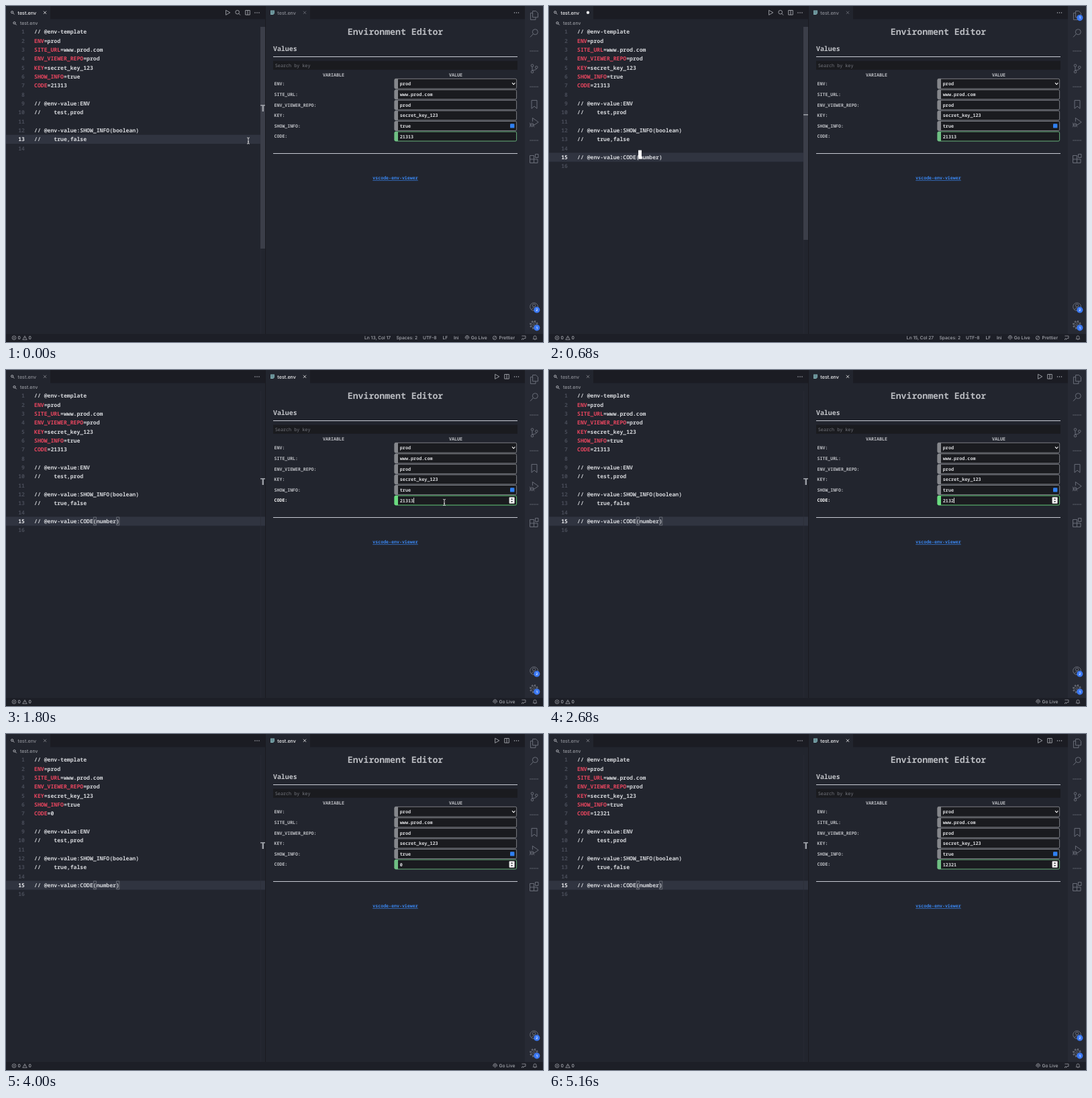
Recreate the animation shown at these times as an HTML page. Size 800 px wide and 500 px high, loop 5200 ms.

```html
<!DOCTYPE html>
<html lang="en">
<head>
<meta charset="utf-8">
<title>Environment Editor</title>
<style>
  html, body { margin: 0; width: 100%; height: 100%; overflow: hidden; background: #22252e; }
  svg { display: block; width: 100vw; height: 100vh; }
  text { white-space: pre; text-rendering: geometricPrecision; }
  .ui { font-family: Inter, "Liberation Sans", sans-serif; fill: #a9abb2; }
  .mono { font-family: "Noto Sans Mono", "DejaVu Sans Mono", monospace; fill: #d6d8dc; }
  .tab { font-size: 7.2px; font-weight: 500; }
  .status { font-size: 6.7px; font-weight: 500; }
  .badge { font-size: 5px; font-weight: 600; fill: #fff; text-anchor: middle; }
  .code { font-size: 8.15px; font-weight: 600; }
  .key { fill: #e8465f; }
  .num { fill: #484c58; text-anchor: end; }
  .num.on { fill: #e8e9ec; font-weight: 700; }
  .label { font-size: 6.55px; font-weight: 600; fill: #bdbfc4; }
  .label.on { font-weight: 700; fill: #fff; }
  .value { font-size: 6.78px; font-weight: 600; fill: #dcdde0; }
  .line { fill: none; stroke: #b4b6bd; stroke-width: .8; }
  .bar { fill: none; stroke: #696d78; stroke-width: 1; stroke-linejoin: round; }
  .mid { text-anchor: middle; }
  .end { text-anchor: end; }
</style>
</head>
<body>
<svg viewBox="0 0 800 500" preserveAspectRatio="none">
  <defs>
    <g id="play"><path class="line" d="M-2.7-3.5L3.5 0L-2.7 3.5Z"/></g>
    <g id="split"><path class="line" d="M-3.3-3.3H3.3V3.3H-3.3ZM0-3.3V3.3"/></g>
    <g id="find"><path class="line" d="M1.8 1.4L4 3.8"/><circle class="line" cx="-.3" cy="-.6" r="2.8"/></g>
    <g id="dots" fill="#b4b6bd"><circle cx="-3" r=".75"/><circle r=".75"/><circle cx="3" r=".75"/></g>
    <g id="close"><path d="M-2.1-2.1L2.1 2.1M2.1-2.1L-2.1 2.1" stroke="currentColor" stroke-width=".8"/></g>
    <g id="lens"><path d="M.8.8L2.6 2.6" stroke="#c6c8cd" stroke-width="1"/><circle cx="-.5" cy="-.5" r="1.6" fill="none" stroke="#c6c8cd" stroke-width=".9"/></g>
    <g id="live" fill="none" stroke="#a9abb2" stroke-width=".7"><path d="M-1.8 2A2.8 2.8 0 1 1 1.8 2M-1 .9A1.4 1.4 0 1 1 1 .9M0 0V3.4"/></g>
    <g id="rule"><path d="M-6.5 0H6.5" stroke="#5c606b" stroke-width="1" stroke-dasharray="2.3 .4"/></g>
  </defs>

  <rect width="800" height="500" fill="#22252e"/>
  <rect width="774" height="19.5" fill="#1b1c23"/>
  <rect width="66" height="20" fill="#22252e"/>
  <rect x="387" width="66" height="20" fill="#22252e"/>
  <rect x="773" width="27" height="488" fill="#272a34"/>
  <rect y="488" width="800" height="12" fill="#1d1f27"/>
  <rect y="499" width="800" height="1" fill="#16171c"/>

  <!-- left group -->
  <use href="#lens" x="9.7" y="9.8"/>
  <text id="tabL" class="ui tab" x="17.5" y="12.5">test.env</text>
  <use id="closeL" href="#close" x="58" y="9.8"/>
  <circle id="dirty" cx="58" cy="9.8" r="2.2" fill="#e8e9ec"/>
  <g id="toolsL"><use href="#play" x="330.3" y="9.8"/><use href="#find" x="345" y="9.8"/><use href="#split" x="360" y="9.8"/></g>
  <use href="#dots" x="374" y="10"/>
  <use href="#lens" x="13" y="25.7"/>
  <text class="ui" font-size="7" x="21" y="28.4">test.env</text>
  <rect id="row" width="386" height="13.34" fill="#303440"/>
  <g id="lines"></g>
  <path id="pair" d="M130.4 219H134.6V231H130.4ZM164.6 219H168.8V231H164.6Z" fill="none" stroke="#7f828a" stroke-width=".7"/>
  <rect id="caret" width="4.9" height="13" fill="#fff"/>
  <path d="M379.3 31V488" stroke="#2b2e38" stroke-width=".7"/>
  <rect id="slider" x="379" y="31" width="7" fill="#3b3e49"/>
  <g id="mark" fill="#9b9ea5"><rect x="379" width="7" height="1.6"/><rect id="stem" x="381.6" width="2.4" height="10"/></g>
  <rect x="386" width="1" height="488" fill="#1a1b21"/>

  <!-- right group -->
  <path d="M394 6.5H400V11L398 13H394Z" fill="#78a3a8"/>
  <path d="M395 8.4H399M395 10.4H399" stroke="#42666c" stroke-width=".6"/>
  <text id="tabR" class="ui tab" x="404.3" y="12.5">test.env</text>
  <use id="closeR" href="#close" x="445" y="9.8"/>
  <g id="toolsR"><use href="#play" x="731.3" y="9.8"/><use href="#split" x="746" y="9.8"/></g>
  <use href="#dots" x="760.5" y="10"/>
  <g class="mono">
    <text class="mid" x="580" y="43" font-size="13.2" font-weight="700" fill="#b9bbc0">Environment Editor</text>
    <text x="398" y="66.6" font-size="9.9" font-weight="700" fill="#c3c5ca">Values</text>
    <path d="M398 75.5H762M398 219.5H762" stroke="#c6c9d2" stroke-width="1"/>
    <rect x="398" y="81.6" width="364" height="13.2" fill="#1a1b1f"/>
    <text x="400.8" y="90.6" font-size="6.75" font-weight="500" fill="#777980">Search by key</text>
    <g class="mid" font-size="6.7" font-weight="700" fill="#bdbfc4">
      <text x="488" y="104.6">VARIABLE</text><text x="670" y="104.6">VALUE</text>
    </g>
    <g id="form"></g>
    <path d="M754 114.4L756.2 116.8L758.4 114.4" fill="none" stroke="#fff" stroke-width="1.1"/>
    <rect x="751" y="175.2" width="6.4" height="6.4" rx="1.2" fill="#2f80f2"/>
    <g id="spin"><rect x="749.6" y="189.3" width="8" height="9.4" rx="1" fill="#f0f0f0"/>
      <path d="M752 193L753.6 191.1L755.2 193ZM752 195L753.6 196.9L755.2 195Z" fill="#33353a"/></g>
    <rect id="ins" y="190" width=".8" height="8" fill="#fff"/>
    <text class="mid" x="580" y="258.4" font-size="6.62" font-weight="700" fill="#3a86f0" text-decoration="underline">vscode-env-viewer</text>
  </g>

  <!-- activity bar -->
  <g class="bar">
    <path d="M784.6 7.5H789.4L792.5 10.6V16.8H784.6ZM784.6 10.4H781.4V20.4H789V16.8"/>
    <circle cx="788.3" cy="38.6" r="4"/><path d="M785.4 41.6L781 46.3"/>
    <circle cx="784" cy="88.6" r="1.8"/><circle cx="784" cy="98" r="1.8"/><circle cx="790.3" cy="91.2" r="1.8"/>
    <path d="M784 90.4V96.2M790.3 93Q790 95.6 784.4 95.6"/>
    <path d="M783 140.4H791V152.6L787 149.2L783 152.6Z"/>
    <path d="M784.4 172V166.6L793.2 172.8L786.8 177.2"/><circle cx="783.6" cy="177" r="2.5"/>
    <path d="M781 175L779.8 174M781 179L779.8 180M780 177H787.2M786.2 179L787.4 180"/>
    <path d="M780.5 222.5H786.5V233.5H780.5ZM780.5 228H792V233.5H786.5M788.5 220.5H793V225.5H788.5Z"/>
    <circle cx="786.6" cy="447.6" r="5.9"/><circle cx="786.6" cy="445.6" r="2.2"/><path d="M782.6 452Q786.6 445.8 790.6 452"/>
    <circle cx="786.4" cy="474.4" r="1.7"/><circle cx="786.4" cy="474.4" r="4.2"/>
    <circle cx="786.4" cy="474.4" r="5.5" stroke-width="1.8" stroke-dasharray="2.16 2.16"/>
  </g>
  <use href="#rule" x="786.7" y="67"/><use href="#rule" x="786.7" y="120.2"/><use href="#rule" x="786.7" y="200"/>
  <g fill="#3b78f2">
    <circle cx="790.8" cy="452.2" r="4.6"/><circle cx="790.8" cy="478.8" r="4.6"/>
    <g id="unsaved"><circle cx="790.8" cy="17.6" r="4.6"/><text class="ui badge" x="790.8" y="19.4">1</text></g>
    <text class="ui badge" x="790.8" y="454">2</text><text class="ui badge" x="790.8" y="480.6">1</text>
  </g>

  <!-- status bar -->
  <g class="ui status">
    <path d="M10.9 492.7L13.1 494.9M13.1 492.7L10.9 494.9M28 490.9L31.2 496.6H24.8ZM28 493V494.8" fill="none" stroke="#a9abb2" stroke-width=".7"/>
    <circle cx="12" cy="493.8" r="2.9" fill="none" stroke="#a9abb2" stroke-width=".7"/>
    <text x="17.6" y="496.2">0</text><text x="33.6" y="496.2">0</text>
    <g id="info">
      <text id="pos" class="end" x="573.2" y="496.2"></text>
      <text x="581.4" y="496.2">Spaces: 2</text><text x="621" y="496.2">UTF-8</text>
      <text x="650.5" y="496.2">LF</text><text x="667" y="496.2">Ini</text>
      <circle cx="728" cy="493.8" r="2.7" fill="none" stroke="#a9abb2" stroke-width=".7"/>
      <path d="M726.1 495.7L729.9 491.9" stroke="#a9abb2" stroke-width=".7"/>
      <text x="734.6" y="496.2">Prettier</text>
    </g>
    <g id="go"><use href="#live" x="687" y="493.4"/><text x="692.8" y="496.2">Go Live</text></g>
    <path d="M768.4 491H774V494.6H772L770.6 496.4V494.6M768.4 497Q768.4 494.8 770 494.2M785.2 495.6L786 494.4V492.8A2 2 0 0 1 790 492.8V494.4L790.8 495.6ZM787.3 496.6H788.7" fill="none" stroke="#a9abb2" stroke-width=".7"/>
  </g>

  <g id="beam" fill="none"><path d="M-1.9-4.6Q0-4.6 0-3.4Q0-4.6 1.9-4.6M0-3.4V3.6M-1.9 4.6Q0 4.6 0 3.4Q0 4.6 1.9 4.6M-1 1.4H1" stroke="#e6e6e6" stroke-width=".9"/></g>
  <path id="arrow" d="M0 0V8.4L1.9 6.7L3.2 9.6L4.6 9L3.3 6.2H5.9Z" fill="#111" stroke="#f2f2f2" stroke-width=".8"/>
</svg>
<script>
const LOOP = 5200, CHAR = 4.89, ROW = 13.34, LEFT = 42;
const ENTER = 360, PASTE = 620, SAVED = 1000, MOVE = 1160, FOCUS = 1740;
const $ = id => document.getElementById(id);
const show = (id, on) => $(id).setAttribute('visibility', on ? 'visible' : 'hidden');
const set = (id, name, value) => $(id).setAttribute(name, value);
const at = (id, x, y) => set(id, 'transform', `translate(${x} ${y})`);
const rowY = n => 31.6 + ROW * (n - 1);
const between = (t, a, b) => t >= a && t < b;
const mix = (a, b, u) => a + (b - a) * u;
const clamp = u => Math.min(1, Math.max(0, u));
const ease = u => u * u * (3 - 2 * u);

const source = ['// @env-template', 'ENV=prod', 'SITE_URL=www.prod.com', 'ENV_VIEWER_REPO=prod',
  'KEY=secret_key_123', 'SHOW_INFO=true', 'CODE=21313', '', '// @env-value:ENV', '//    test,prod', '',
  '// @env-value:SHOW_INFO(boolean)', '//    true,false', '', '// @env-value:CODE(number)', ''];

$('lines').innerHTML = source.map((line, i) => {
  const y = 41.2 + ROW * i, cut = line.indexOf('=');
  const body = cut > 0
    ? `<tspan class="key">${line.slice(0, cut)}</tspan><tspan id="v${i}">${line.slice(cut)}</tspan>` : line;
  return `<g id="line${i + 1}"><text id="num${i + 1}" class="mono code num" x="28" y="${y}">${i + 1}</text>` +
    `<text id="text${i + 1}" class="mono code" x="${LEFT}" y="${y}">${body}</text></g>`;
}).join('');

// The first field is a select, slightly taller than the inputs below it.
$('form').innerHTML = source.slice(1, 7).map((line, i) => {
  const [key, value] = line.split('=');
  const y = i ? 116.2 + 15.57 * i : 115.7, half = i ? 7 : 7.4;
  const color = key === 'CODE' ? '#6fbf83' : '#85878c';
  return `<text id="label${key}" class="label" x="399.6" y="${y + 2.2}">${key}:</text>
    <rect id="box${key}" x="579" y="${y - half}" width="181.6" height="${2 * half}" rx="1.8" fill="#1a1b1f" stroke="${color}" stroke-width=".9"/>
    <path id="edge${key}" d="M584 ${y - half}H580.4Q578.6 ${y - half} 578.6 ${y - 5.2}V${y + 5.2}Q578.6 ${y + half} 580.4 ${y + half}H584Z" fill="${color}"/>
    <text id="value${key}" class="value" x="586.8" y="${y + 2.5}">${value}</text>`;
}).join('');

const typed = [[0, '21313'], [2280, '2131'], [2440, '213'], [2640, '2132'], [3080, '213'], [3200, '21'],
  [3320, '2'], [3440, ''], [3540, '0'], [4200, '1'], [4300, '12'], [4400, '123'], [4500, '1232'], [4600, '12321']];
const stored = [[0, '21313'], [3760, '0'], [4800, '12321']];
const pick = (steps, t) => steps.filter(s => s[0] <= t).pop()[1];

function caretAt(t) {
  const stops = [[LEFT + 16 * CHAR, rowY(13)], [LEFT, rowY(14)], [LEFT + 26 * CHAR, rowY(15)]];
  const n = t < ENTER ? 0 : t < PASTE ? 1 : 2;
  if (!n) return stops[0];
  const u = Math.sin(clamp((t - (n === 1 ? ENTER : PASTE)) / 120) * Math.PI / 2);
  return [0, 1].map(k => mix(stops[n - 1][k], stops[n][k], u));
}

function mouseAt(t) {
  if (t < 1440) {
    const u = ease(clamp((t - MOVE) / 280));
    return [mix(361, 548, u), mix(200.5, 72.5, u)];
  }
  const u = ease(clamp((t - 1440) / 260));
  return [mix(548, 653, u), mix(72.5, 197, u)];
}

function draw(t) {
  const line = t < ENTER ? 13 : t < PASTE ? 14 : 15;
  const right = t >= FOCUS, dirty = between(t, ENTER, SAVED);

  set('row', 'y', rowY(line));
  for (let n = 13; n <= 16; n++) {
    show('line' + n, n <= line + 1);
    $('num' + n).classList.toggle('on', n === line);
  }
  show('text15', line === 15);
  $('v6').textContent = '=' + pick(stored, t);
  show('pair', t >= 720);
  at('caret', ...caretAt(t));
  show('caret', between(t, 40, FOCUS));
  set('slider', 'opacity', 1 - clamp((t - 1260) / 340));
  set('slider', 'height', 330 - 6.5 * (line - 13));
  at('mark', 0, 147 + 7 * (line - 13));
  show('stem', !between(t, ENTER, 760));

  show('closeL', !dirty);
  show('dirty', dirty);
  show('unsaved', dirty);
  show('toolsL', !right);
  show('toolsR', right);
  $('tabL').style.fill = $('closeL').style.color = right ? '#8b8d95' : '#f0f0f2';
  $('tabR').style.fill = right ? '#f0f0f2' : '#8b8d95';
  $('closeR').style.color = right ? '#f0f0f2' : '#6f727b';
  show('info', !right);
  $('pos').textContent = `Ln ${line}, Col ${[17, 1, 27][line - 13]}`;
  at('go', right ? 41.6 : 0, 0);

  const editing = between(t, FOCUS, 3640) || between(t, 4160, 4760);
  const value = pick(typed, t), green = editing ? '#6bdc80' : '#6fbf83';
  $('valueCODE').textContent = value;
  $('labelCODE').classList.toggle('on', editing);
  set('boxCODE', 'stroke', green);
  set('edgeCODE', 'fill', green);
  show('spin', t >= 1660);
  show('ins', editing);
  set('ins', 'x', 586.9 + value.length * 4.07);

  const [x, y] = mouseAt(t);
  const seen = t < ENTER || between(t, MOVE, 2280);
  const beam = x < 386 || (x > 579 && y > 108);
  at('beam', x, y);
  at('arrow', x, y);
  show('beam', seen && beam);
  show('arrow', seen && !beam);
}

const start = performance.now();
function tick() {
  draw((performance.now() - start) % LOOP);
  requestAnimationFrame(tick);
}
tick();
</script>
</body>
</html>
```
